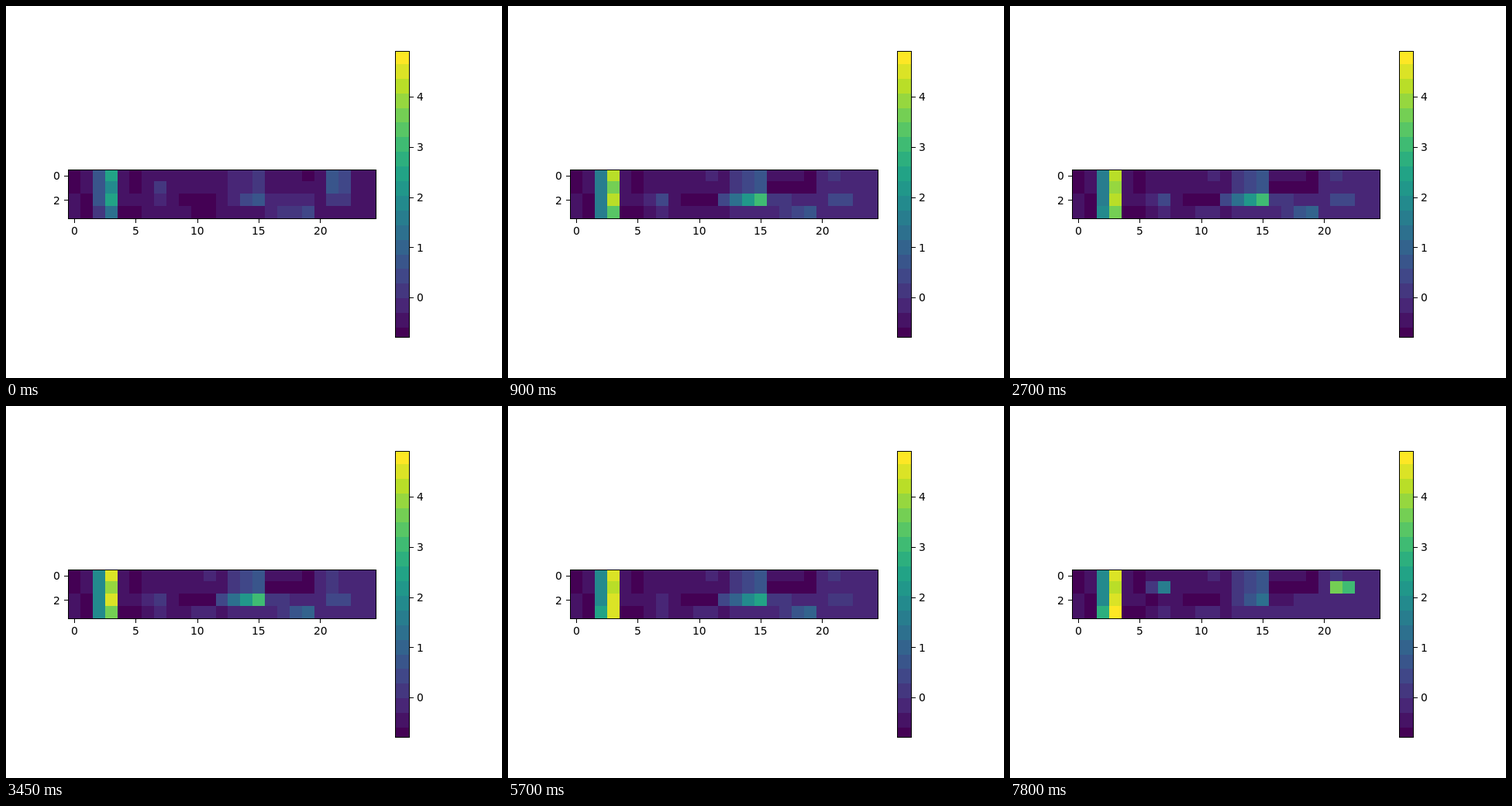
Write an HTML page that moves like this. It is 640 px wide and 480 px high and loops after 8000 ms.

```html
<!DOCTYPE html>
<html lang="en">
<head>
<meta charset="utf-8">
<title>Heatmap</title>
<style>
html, body { margin: 0; width: 100%; height: 100%; overflow: hidden; background: #fff; }
svg { display: block; width: 640px; height: 480px; }
text { font: 13.89px "DejaVu Sans", sans-serif; }
rect, path { shape-rendering: crispEdges; }
</style>
</head>
<body>
<svg id="stage" viewBox="0 0 640 480"></svg>
<script>
const LOOP = 8000, STEP = 150, COLS = 25, ROWS = 4, LEVELS = 20;
const CELL = 15.872, DIGIT = 8.84;
const STOPS = ['#440154', '#482475', '#414487', '#355f8d', '#2a788e', '#21918c',
  '#22a884', '#44bf70', '#7ad151', '#bddf26', '#fde725'];
const stage = document.getElementById('stage');

function add(tag, attrs, content = '') {
  const node = document.createElementNS('http://www.w3.org/2000/svg', tag);
  for (const name in attrs) node.setAttribute(name, attrs[name]);
  node.textContent = content;
  stage.append(node);
  return node;
}

const box = (left, top, right, bottom, fill) =>
  add('rect', { x: left, y: top, width: right - left, height: bottom - top, fill });
const line = d => add('path', { d, fill: 'none', stroke: '#000', 'stroke-width': 1 });
// Labels sit on whole pixels; align is the share of the width left of x.
const label = (x, y, align, value) => add('text', {
  x: Math.round(x - align * DIGIT * String(value).length), y: Math.round(y) }, value);
const snap = v => Math.round(v) + 0.5;
const lerp = (a, b, share) => a + (b - a) * share;

function colormap(u) {
  const at = u * (STOPS.length - 1), i = Math.min(Math.floor(at), STOPS.length - 2);
  const channel = (hex, c) => parseInt(hex.slice(1 + 2 * c, 3 + 2 * c), 16);
  const mix = c => Math.round(lerp(channel(STOPS[i], c), channel(STOPS[i + 1], c), at - i));
  return `rgb(${mix(0)},${mix(1)},${mix(2)})`;
}
const palette = Array.from({ length: LEVELS }, (_, k) => colormap(k / (LEVELS - 1)));

// Colour bar: equal bands, with shorter ones at both ends.
const bandEdge = k => k === 0 ? 427 : k === LEVELS ? 58 : Math.round(415 - 18.9 * (k - 1));
palette.forEach((fill, k) => box(502, bandEdge(k + 1), 521, bandEdge(k), fill));

const colX = c => Math.round(80.1 + CELL * c);
const rowY = r => Math.round(210.6 + CELL * r);
const cells = Array.from({ length: ROWS }, (_, r) => Array.from({ length: COLS }, (_, c) =>
  box(colX(c), rowY(r), colX(c + 1), rowY(r + 1), palette[1])));

// Frames, ticks and labels.
line('M80.5 211.5H477.5V274.5H80.5Z');
line('M502.5 58.5H520.5V427.5H502.5Z');
for (let v = 0; v <= 20; v += 5) {
  const x = 80 + CELL * (v + 0.5);
  line(`M${snap(x)} 274V280`);
  label(x, 295, 0.5, v);
}
for (const v of [0, 2]) {
  const y = 210.66 + CELL * (v + 0.5);
  line(`M75 ${snap(y)}H81`);
  label(70.3, y + 5.3, 1, v);
}
for (let v = 0; v <= 4; v++) {
  const y = 376.1 - 64.8 * v;
  line(`M520 ${snap(y)}H526`);
  label(529.8, y + 5.3, 0, v);
}

// A curve through [seconds, level] points, flat before and after them.
const curve = (...points) => t => {
  const next = points.findIndex(p => p[0] > t);
  if (next < 0) return points[points.length - 1][1];
  if (next === 0) return points[0][1];
  const [a, b] = [points[next - 1], points[next]];
  return lerp(a[1], b[1], (t - a[0]) / (b[0] - a[0]));
};
const settle = (from, to) => curve([0, from], [0.9, to]);
const flat = level => () => level;

// A ridge runs across neighbouring columns, from one level to another.
const ridges = [];
function ridge(rows, first, last, startLevel, endLevel = startLevel) {
  ridges.push({ rows, first, last, startLevel, endLevel });
}
const ALL = [0, 1, 2, 3];

// Quiet background with a few low spots.
ridge([0, 1], 0, 0, flat(0));
ridge([2, 3], 1, 1, flat(0));
ridge([0, 1], 5, 5, flat(0));
ridge([3], 4, 5, flat(0));
ridge([2], 9, 11, flat(0));
ridge([0], 19, 19, flat(0));
ridge([1], 16, 19, settle(1, 0));
ridge([0], 11, 11, settle(1, 2));
ridge([3], 10, 11, curve([0, 0], [2.7, 2]));
ridge([3], 7, 7, settle(1, 2));
ridge(ALL, 20, 24, settle(1, 2));

// Bright pair on the left.
ridge(ALL, 2, 2, curve([0, 5], [0.9, 8], [6, 9]));
ridge([3], 2, 2, curve([0, 3], [0.9, 8], [4.5, 9], [6.3, 12]));
ridge([0, 2], 3, 3, curve([0, 11], [0.9, 16.5], [4.35, 18]));
ridge([1], 3, 3, curve([0, 9], [0.9, 15], [6.3, 17]));
ridge([3], 3, 3, curve([0, 7], [0.9, 14], [4.35, 15], [6.3, 19]));

// Slopes in the middle.
ridge([0, 1], 13, 15, settle(1.5, 2.6), settle(3, 5));
ridge([2], 12, 15, curve([0, 1], [0.9, 4], [5.7, 4], [6.3, 1]),
  curve([0, 5], [0.9, 13], [4.35, 13], [5.7, 11], [6.3, 7]));
ridge([2], 16, 19, curve([0, 2], [0.9, 3], [5.7, 3], [6.3, 1]), flat(2));
ridge([3], 13, 15, settle(1, 2));
ridge([3], 16, 19, flat(2), curve([0, 4], [2.7, 6], [5.7, 6], [6.3, 2]));

// Bursts on the right, echoed more faintly near column 7.
const burst = curve([0, 5], [0.9, 2], [3.3, 2], [4.35, 8], [5.1, 2], [5.7, 2], [6.3, 6], [7.8, 15]);
const echo = share => t => Math.max(1, burst(t) * share);
ridge([0], 21, 22, settle(5, 3), settle(4, 2));
ridge([1], 21, 22, burst, echo(0.86));
ridge([2], 21, 22, curve([0, 3], [0.9, 4], [4.35, 4], [6.3, 2]));
ridge([1], 6, 7, echo(0.22), echo(0.5));
ridge([2], 6, 7, curve([0, 1], [0.9, 2], [4.35, 2], [6.3, 0]),
  curve([0, 2], [0.9, 4], [2.7, 4], [6.3, 1]));

function draw(time) {
  const t = Math.floor(time / STEP) * STEP / 1000;
  const levels = cells.map(row => row.map(() => 1));
  for (const { rows, first, last, startLevel, endLevel } of ridges) {
    for (let c = first; c <= last; c++) {
      const share = (c - first) / (last - first || 1);
      const level = lerp(startLevel(t), endLevel(t), share);
      rows.forEach(r => { levels[r][c] = level; });
    }
  }
  cells.forEach((row, r) => row.forEach((cell, c) =>
    cell.setAttribute('fill', palette[Math.round(levels[r][c])])));
}

const start = performance.now();
function tick() {
  draw((performance.now() - start) % LOOP);
  requestAnimationFrame(tick);
}
tick();
</script>
</body>
</html>
```
